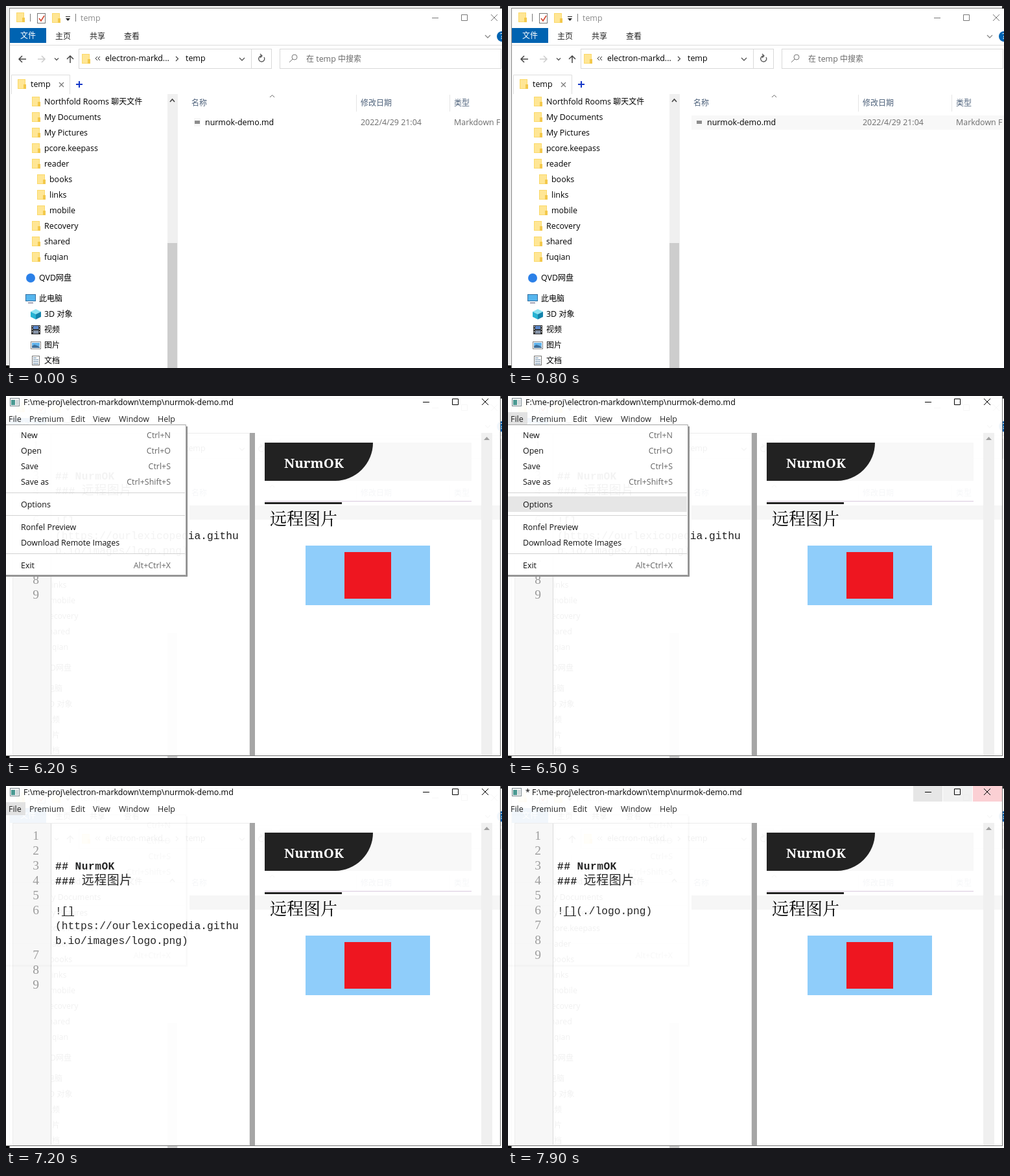
An HTML page that plays this animation: 765 by 559 pixels, repeating every 8000 ms.

```html
<!DOCTYPE html>
<html lang="zh-CN">
<head>
<meta charset="utf-8">
<title>Remote images demo</title>
<style>
html, body { margin: 0; width: 100%; height: 100%; overflow: hidden; background: #fff; }
svg { display: block; width: 765px; height: 559px; }
text { font: 12.45px "Open Sans", "Noto Sans CJK SC", "Noto Sans CJK", sans-serif; white-space: pre; }
.cjk { font-size: 12px; }
.mono { font: 16.25px "Liberation Mono", "Noto Sans CJK SC", "Noto Sans CJK", monospace; }
.head { font-weight: bold; letter-spacing: .45px; }
.head .cjk { font-size: 19px; font-weight: 500; }
.num { font: 19.5px "Liberation Serif", serif; fill: #999; text-anchor: end; }
.brand { font: bold 20.5px "Noto Serif", serif; }
.big, .big .cjk { font: 500 26px "Noto Serif CJK SC", "Noto Sans CJK SC", "Noto Sans CJK", serif; }
.key { text-anchor: end; }

.anim { animation: 8s step-end infinite; }
.row { animation-name: row; }
.editor { animation-name: editor; }
.menu { animation-name: menu; }
.names { animation-name: names; }
.pick { animation-name: pick; }
.file { animation-name: file; }
.old { animation-name: old; }
.new { animation-name: new; }
.min { animation-name: min; }
.max { animation-name: max; }
.close { animation-name: close; }

@keyframes row {
  0% { fill: #fff; } 5% { fill: #f1f9ff; } 6.25% { fill: #e5f3ff; }
  8.75% { fill: #f1f6fa; } 10%, 100% { fill: #f8f8f8; }
}
@keyframes editor { 0% { opacity: 0; } 22.5%, 100% { opacity: 1; } }
@keyframes menu { 0% { opacity: 0; } 77.5% { opacity: 1; } 90%, 100% { opacity: .05; } }
@keyframes names { 0% { opacity: 1; } 90%, 100% { opacity: 0; } }
@keyframes pick {
  0% { opacity: 0; transform: translateY(0); }
  80% { opacity: 1; transform: translateY(96px); }
  81.25% { opacity: 1; transform: translateY(155px); }
  82.5% { opacity: 1; transform: translateY(214px); }
  90%, 100% { opacity: 0; transform: translateY(214px); }
}
@keyframes file { 0% { opacity: 0; } 78.75% { opacity: 1; } 91.25%, 100% { opacity: 0; } }
@keyframes old { 0% { opacity: 1; } 93.75%, 100% { opacity: 0; } }
@keyframes new { 0% { opacity: 0; } 93.75%, 100% { opacity: 1; } }
@keyframes min { 0% { opacity: 0; } 96.25%, 100% { opacity: 1; } }
@keyframes max { 0% { opacity: 0; } 97.5% { opacity: 1; } 98.75%, 100% { opacity: .5; } }
@keyframes close { 0% { opacity: 0; } 98.75%, 100% { opacity: 1; } }
</style>
</head>
<body>
<svg id="stage" viewBox="0 0 765 559"></svg>
<script>
const box = (x, y, w, h, fill, more = '') =>
  `<rect x="${x}" y="${y}" width="${w}" height="${h}" fill="${fill}" ${more}/>`;
const frame = (x, y, w, h, color, fill = 'none') =>
  box(x + .5, y + .5, w - 1, h - 1, fill, `stroke="${color}"`);
const ink = (d, color = '#555', w = 1, more = '') =>
  `<path d="${d}" fill="none" stroke="${color}" stroke-width="${w}" ${more}/>`;
const shape = (d, fill) => `<path d="${d}" fill="${fill}"/>`;
const say = (x, y, s, fill = '#000', cls = '') =>
  `<text x="${x}" y="${y}" fill="${fill}" class="${cls}">` +
  s.replace(/[\u4e00-\u9fff]+/g, '<tspan class="cjk">$&</tspan>') + '</text>';
const group = (cls, ...parts) => `<g class="anim ${cls}">${parts.join('')}</g>`;

const folder = (x, y) =>
  box(x, y, 12, 15, '#fbd969') + box(x + 1, y + 1, 10, 13, '#ffe695') +
  shape(`M${x + 9} ${y + 8}h4v7h-4z`, '#f3c84b');
const chevron = (x, y, r = 4, color = '#555', w = 1.3) =>
  ink(`M${x - r} ${y - r / 2}l${r} ${r}l${r} ${-r}`, color, w);
const buttons = (x, y, color) =>
  ink(`M${x} ${y + .5}h10M${x + 45.5} ${y - 4.5}h9v9h-9z` +
    `M${x + 91} ${y - 5}l10 10m0-10l-10 10`, color);

const FILE = 'nurmok-demo.md';
const PATH = 'F:\\me-proj\\electron-markdown\\temp\\' + FILE;

function titleBar() {
  return [
    folder(16, 10), box(37, 12, 1, 12, '#777'),
    frame(48, 11, 13, 16, '#777', '#fff'), ink('M51 19l3 4l5-8', '#d2472f', 1.6),
    folder(71, 11), box(92, 16, 7, 1, '#222'), shape('M92 19h7l-3.5 4z', '#222'),
    box(107, 12, 1, 12, '#777'), say(115, 23, 'temp', '#8a8a8a'),
    buttons(657, 18, '#777'),
    box(6, 34, 56, 23, '#0063b1'), say(22, 50, '文件', '#fff'),
    say(76, 51, '主页', '#222'), say(129, 51, '共享', '#222'), say(182, 51, '查看', '#222'),
    chevron(743, 47, 4, '#888'), '<circle cx="765" cy="47" r="8" fill="#0063b1"/>',
    say(762, 51, '?', '#fff'), box(6, 60, 759, 1, '#dcdcdc')
  ].join('');
}

function addressBar() {
  return [
    ink('M31 82H20M25 77l-5 5l5 5', '#444', 1.5),
    ink('M49 82h11M55 77l5 5l-5 5', '#ccc', 1.5),
    chevron(78, 82, 3), ink('M99 88V77M94 82l5-5l5 5', '#444', 1.5),
    frame(112, 66, 298, 31, '#d9d9d9'), box(378, 67, 1, 29, '#d9d9d9'),
    folder(117, 74), ink('M141 78l-3 3l3 3M145 78l-3 3l3 3', '#333'),
    say(153, 85, 'electron-markd...'), ink('M262 78l3.5 3.5l-3.5 3.5', '#444', 1.2),
    say(277, 85, 'temp'), chevron(364, 82),
    ink('M398 79a4.5 4.5 0 1 1-4-2M392 74l3 3l-3 3', '#555', 1.3),
    frame(422, 66, 342, 31, '#d9d9d9'),
    '<circle cx="445" cy="79" r="4" fill="none" stroke="#777"/>', ink('M442 82l-5 5', '#777'),
    say(463, 86, '在 temp 中搜索', '#6a6a6a'),
    ink('M8.5 136V106.5H98.5V136', '#dedede'), folder(18, 113), say(38, 125, 'temp'),
    ink('M82 118l7 7m0-7l-7 7', '#777', 1.2), ink('M108 121h10m-5-5v10', '#1437c8', 2)
  ].join('');
}

function tree() {
  const names = ['Northfold Rooms 聊天文件', 'My Documents', 'My Pictures', 'pcore.keepass',
    'reader', ' books', ' links', ' mobile', 'Recovery', 'shared', 'fuqian'];
  const rows = names.map((name, i) => {
    const dx = name[0] === ' ' ? 8 : 0, y = 152 + 24 * i;
    return folder(40 + dx, y - 12) + say(59 + dx, y, name.trim());
  });
  return rows.join('') + [
    '<circle cx="38" cy="420" r="7" fill="#2b80e8"/>', say(51, 424, 'QVD网盘'),
    frame(30, 445, 16, 11, '#356f9f', '#55b5ee'), box(34, 458, 8, 1, '#557'),
    say(51, 456, '此电脑'),
    shape('M38 472l8-4l8 4l-8 4z', '#8de3f2'), shape('M38 472l8 4v8l-8-4z', '#27b3d3'),
    shape('M54 472l-8 4v8l8-4z', '#1484ac'), say(59, 480, '3D 对象'),
    box(39, 493, 14, 14, '#333'), box(42, 494, 8, 5, '#5b86c8'), box(42, 501, 8, 5, '#8794a8'),
    ink('M40.5 494v12M51.5 494v12', '#ddd', 1, 'stroke-dasharray="2 2"'), say(59, 504, '视频'),
    frame(38, 518, 16, 12, '#888', '#fff'), box(40, 520, 12, 5, '#62b4ec'),
    shape('M40 528v-3l4-2l8 3v2z', '#3f709b'), say(59, 528, '图片'),
    frame(40, 540, 12, 15, '#777', '#fff'), ink('M42 543.5h5M42 546.5h8M42 549.5h8M42 552.5h8', '#5b7f9f'),
    say(59, 552, '文档'),
    box(249, 136, 16, 423, '#f0f0f0'), box(249, 366, 15, 193, '#cdcdcd'),
    ink('M253 148l3.5-4l3.5 4', '#444', 1.6)
  ].join('');
}

function list() {
  const blue = '#4c607a', grey = '#6d6d6d';
  return [
    say(286, 154, '名称', blue), say(547, 154, '修改日期', blue), say(691, 154, '类型', blue),
    ink('M407 141l3.5-3.5l3.5 3.5', '#666'),
    box(540, 137, 1, 26, '#e5e5e5'), box(684, 137, 1, 26, '#e5e5e5'),
    box(283, 169, 482, 22, '#fff', 'class="anim row"'),
    box(290, 173, 10, 13, '#f7f7f7'), box(291, 177, 8, 5, '#8c8c8c'),
    say(307, 184, FILE), say(547, 184, '2022/4/29 21:04', grey), say(691, 184, 'Markdown F', grey)
  ].join('');
}

function explorer() {
  return box(0, 0, 765, 559, '#ededed') + box(0, 555, 6, 4, '#000') +
    box(5, 3, 760, 556, '#8a8a8a') + box(6, 4, 759, 555, '#fff') +
    box(762, 0, 3, 4, '#222') + titleBar() + addressBar() + tree() + list();
}

const codeLine = (i, s, cls = '') => say(76, 83 + 23 * i, s, '#1c1c1c', 'mono ' + cls);
const numbers = (from, to, shift) => {
  let out = '';
  for (let n = from; n <= to; n++) out += say(51, 83 + 23 * (n - 1 + shift), String(n), '#999', 'num');
  return out;
};

function source() {
  return [
    box(10, 57, 59, 498, '#f7f7f7'), box(69, 57, 1, 498, '#dadada'),
    frame(10, 57, 366, 498, '#ececec'),
    numbers(1, 6, 0), codeLine(2, '## NurmOK', 'head'), codeLine(3, '### 远程图片', 'head'),
    box(86, 200, 19, 1, '#111'),
    group('old', numbers(7, 9, 2), codeLine(5, '![]'),
      codeLine(6, '(https://ourlexicopedia.githu'), codeLine(7, 'b.io/images/logo.png)')),
    group('new', numbers(7, 9, 0), codeLine(5, '![](./logo.png)'))
  ].join('');
}

function preview() {
  return [
    box(376, 57, 8, 498, '#a6a6a6'),
    box(399, 72, 319, 59, '#f8f8f8'),
    shape('M399 72H566A59 59 0 0 1 507 131H399z', '#222'),
    say(429, 111, 'NurmOK', '#fff', 'brand'),
    box(399, 162, 319, 1, '#d9c9de'), box(399, 164, 119, 3, '#222'),
    say(407, 199, '远程图片', '#000', 'big'),
    box(462, 231, 192, 92, '#8fcdfa'), box(522, 241, 72, 72, '#ee1620'),
    box(733, 57, 17, 498, '#f0f0f0'), shape('M737 68h9l-4.5-5z', '#a0a0a0')
  ].join('');
}

function menu() {
  const items = [[65, 'New', 'Ctrl+N'], [89, 'Open', 'Ctrl+O'], [113, 'Save', 'Ctrl+S'],
    [137, 'Save as', 'Ctrl+Shift+S'], [172, 'Options'], [207, 'Ronfel Preview'],
    [231, 'Download Remote Images'], [266, 'Exit', 'Alt+Ctrl+X']];
  return group('menu',
    box(0, 45, 277, 231, '#fff', 'opacity=".95"'),
    ink('M0 44.5H277.5V276.5H0', '#a5a5a5'),
    shape('M278 47h2v232H0v-2h278z', '#8f8f8f'),
    box(0, 0, 276, 24, '#e6e6e6', 'class="anim pick"'),
    [149, 184, 243].map(y => box(0, y, 276, 1, '#d2d2d2')).join(''),
    group('names', ...items.map(([y, name]) => say(23, y, name, '#111'))),
    items.map(([y, , key = '']) => say(254, y, key, '#666', 'key')).join(''));
}

function editor() {
  const tabs = [[4, 'File'], [36, 'Premium'], [100, 'Edit'], [134, 'View'], [174, 'Window'], [234, 'Help']];
  return group('editor',
    box(0, 0, 762, 555, '#fff', 'opacity=".945"'),
    box(283, 169, 479, 22, '#f6f6f6'),
    box(0, 555, 763, 1, '#777'), box(762, 0, 1, 556, '#777'),
    frame(6, 3, 15, 13, '#7d8b91', '#f5f5f5'), box(8, 6, 6, 8, '#4b9a93'), box(15, 6, 4, 8, '#cfd8da'),
    group('old', say(27, 14, PATH)), group('new', say(27, 14, '* ' + PATH)),
    box(625, 0, 45, 24, '#e6e6e6', 'class="anim min"'),
    box(671, 0, 45, 24, '#e4e4e4', 'class="anim max"'),
    box(717, 0, 45, 24, '#fbd0d4', 'class="anim close"'),
    buttons(643, 9, '#000'),
    box(0, 25, 30, 20, '#e2e2e2', 'class="anim file"'),
    tabs.map(([x, s]) => say(x, 40, s, '#222')).join(''),
    source(), preview(), menu());
}

document.getElementById('stage').innerHTML = explorer() + editor();
</script>
</body>
</html>
```
